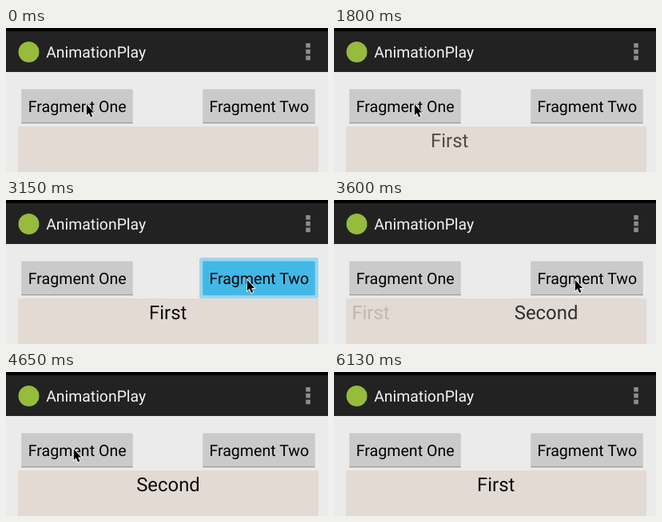
An HTML page that plays this animation: 403x180 px, repeating every 7.01 s.

```html
<!DOCTYPE html>
<html lang="en">
<head>
<meta charset="utf-8">
<title>AnimationPlay</title>
<style>
  html, body { margin: 0; width: 100%; height: 100%; overflow: hidden; background: #ebebeb; }
  svg { display: block; width: 100%; height: 100%; }
  text {
    font-family: Roboto, "Open Sans", sans-serif; font-size: 19.6px;
    text-anchor: middle; text-rendering: geometricPrecision;
  }
  .title { font-size: 19.4px; text-anchor: start; fill: #f4f4f4; }
  .page { font-size: 23.9px; fill: #0c0c0c; }
  .halo, .pressed .edge { visibility: hidden; }
  .pressed .halo { visibility: visible; }
  .face { fill: #cacaca; }
  .pressed .face { fill: #42b8e6; }
</style>
</head>
<body>
<svg viewBox="0 0 403 180">
  <defs>
    <clipPath id="frame"><rect x="15" y="123" width="376" height="57"/></clipPath>
  </defs>

  <rect width="403" height="180" fill="#ebebeb"/>
  <rect width="403" height="55" fill="#222"/>
  <rect width="403" height="4" fill="#000"/>
  <circle cx="28.5" cy="30" r="13" fill="#97bb3c"/>
  <text class="title" x="50.2" y="37">AnimationPlay</text>
  <g fill="#8c8c8c">
    <rect x="375.3" y="19" width="5.6" height="5.6"/>
    <rect x="375.3" y="26.8" width="5.6" height="5.6"/>
    <rect x="375.3" y="34.6" width="5.6" height="5.6"/>
  </g>

  <rect x="15" y="123" width="376" height="57" fill="#e3dad4"/>

  <g id="one">
    <rect class="halo" x="15" y="72" width="148" height="51" rx="3" fill="#9bd6ef"/>
    <rect class="face" x="19.2" y="76.6" width="139.6" height="42.6" rx="1"/>
    <rect class="edge" x="19.2" y="118.2" width="139.6" height="1" fill="#929292"/>
    <text x="89.2" y="105.4">Fragment One</text>
  </g>
  <g id="two">
    <rect class="halo" x="242" y="72" width="149" height="51" rx="3" fill="#9bd6ef"/>
    <rect class="face" x="246.2" y="76.6" width="140.6" height="42.6" rx="1"/>
    <rect class="edge" x="246.2" y="118.2" width="140.6" height="1" fill="#929292"/>
    <text x="316.8" y="105.4">Fragment Two</text>
  </g>

  <g clip-path="url(#frame)">
    <text class="page" id="first" x="202.7" y="148.6">First</text>
    <text class="page" id="second" x="203" y="148.6">Second</text>
  </g>

  <path id="cursor" d="M.8 .5V14L3.8 11.2L6.1 16.6L8.4 15.6L6.2 10.5H10.2Z"
        fill="#000" stroke="#fff" stroke-width="1.6" paint-order="stroke"/>
</svg>
<script>
  const LOOP = 7010, SLIDE = 400, HALF = 188, FULL = 376;
  const $ = id => document.getElementById(id);
  const one = $('one'), two = $('two'), first = $('first'), second = $('second'), cursor = $('cursor');

  // The screen refreshes in coarse steps of about 150 ms
  const lateTicks = [6130, 5980, 5840, 5690, 5540, 5400];
  const tick = t => t < 5400 ? Math.floor(t / 150) * 150 : lateTicks.find(k => t >= k);

  // Pointer stops: time, x, y
  const stops = [
    [0, 100, 95], [2250, 100, 95], [2400, 141, 96], [2850, 301, 99.5],
    [3750, 301, 99.5], [4050, 131, 98], [4650, 84, 96], [5690, 84, 96], [5980, 190, 108]
  ];

  function pointerAt(t) {
    const i = stops.findIndex(s => s[0] > t);
    if (i < 0) return stops[stops.length - 1].slice(1);
    const [t0, x0, y0] = stops[i - 1], [t1, x1, y1] = stops[i];
    const k = (t - t0) / (t1 - t0);
    return [x0 + (x1 - x0) * k, y0 + (y1 - y0) * k];
  }

  // Accelerate-decelerate progress of a slide begun at `start`
  function progress(t, start) {
    const k = Math.min(1, Math.max(0, (t - start) / SLIDE));
    return (1 - Math.cos(Math.PI * k)) / 2;
  }

  function place(el, dx, alpha) {
    el.setAttribute('transform', `translate(${dx} 0)`);
    el.setAttribute('opacity', alpha);
  }

  const enter = (el, p, from) => place(el, from * (1 - p), p);
  const leave = (el, p, to) => place(el, to * p, 1 - p);
  const within = (t, a, b) => t >= a && t < b;

  function draw(now) {
    const t = tick(now % LOOP);
    const toSecond = progress(t, 3307), back = progress(t, 5318);

    one.classList.toggle('pressed', within(t, 1500, 1650) || within(t, 5250, 5400));
    two.classList.toggle('pressed', within(t, 3150, 3300));

    if (t < 3300) enter(first, progress(t, 1550), -HALF);
    else if (t < 5300) leave(first, toSecond, -HALF);
    else enter(first, back, -HALF);

    if (t < 5300) enter(second, toSecond, FULL);
    else leave(second, back, HALF);

    const [x, y] = pointerAt(t);
    cursor.setAttribute('transform', `translate(${x} ${y})`);
    cursor.setAttribute('visibility', t < 6130 ? 'visible' : 'hidden');
  }

  const begin = performance.now();
  function run() {
    draw(performance.now() - begin);
    requestAnimationFrame(run);
  }
  run();
</script>
</body>
</html>
```
